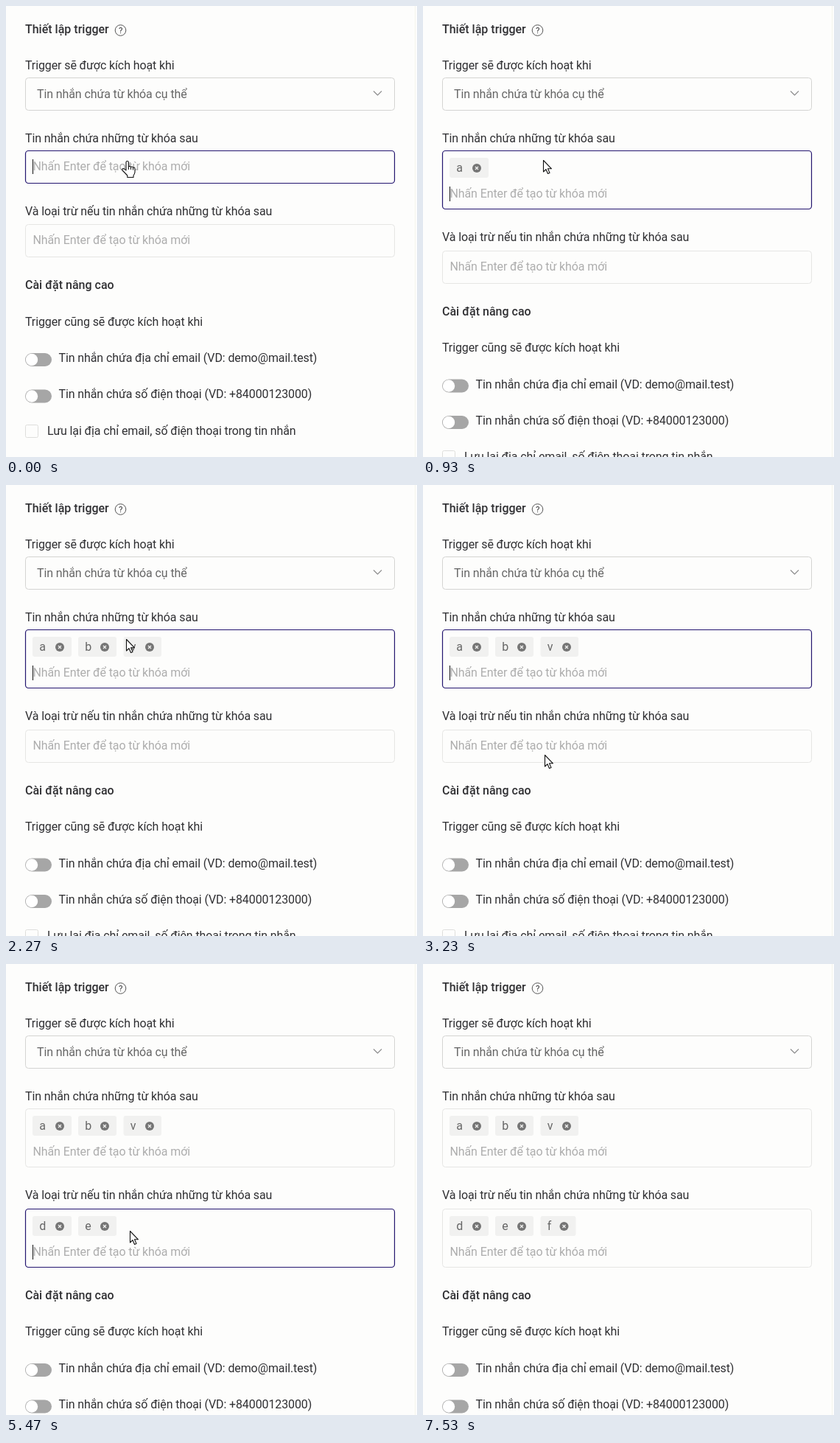
Animation of 558 by 612 pixels, one loop 7.56 s. Source, as an HTML page:

```html
<!DOCTYPE html>
<html lang="vi">
<head>
<meta charset="utf-8">
<style>
html, body { margin: 0; width: 100%; height: 100%; overflow: hidden; background: #fdfdfc; }
svg { display: block; }
text { font: 16px Roboto, sans-serif; letter-spacing: -.11px; fill: #303033; white-space: pre; }
.bold { font-weight: 500; letter-spacing: 0; }
.hint { fill: #adadad; }
.soft { fill: #666; }
</style>
</head>
<body>
<svg id="stage" width="558" height="612" viewBox="0 0 558 612"></svg>
<script>
const LOOP = 7560;
const stage = document.getElementById('stage');

// Keywords: letter, time typed, time confirmed with Enter
const fields = [
  { from: 0, to: 4080, keys: [['a', 480, 720], ['b', 1180, 1430], ['v', 1860, 2130]] },
  { from: 4080, to: 7000, keys: [['d', 4680, 4860], ['e', 5130, 5310], ['f', 5840, 6080]] }
];
const tagX = [36, 98, 159.5];
const tagW = { a: 53, b: 52, v: 51.5, d: 53, e: 52, f: 48 };

// Pointer: time, x, y
const path = [[0, 163, 209], [2480, 163, 209], [3150, 165, 366], [3400, 165, 366], [3800, 168, 362], [LOOP, 168, 362]];

const text = (x, y, s, cls = '') => `<text x="${x}" y="${y}" class="${cls}">${s}</text>`;
const box = (x, y, w, h, r, fill, stroke = 'none', sw = 1) =>
  `<rect x="${x}" y="${y}" width="${w}" height="${h}" rx="${r}" fill="${fill}" stroke="${stroke}" stroke-width="${sw}"/>`;
const line = (d, color, w = 1, fill = 'none') =>
  `<path d="${d}" stroke="${color}" stroke-width="${w}" fill="${fill}" stroke-linejoin="round"/>`;

function tag(letter, i, y) {
  const x = tagX[i], w = tagW[letter], cx = x + w - 16, cy = y + 14;
  return box(x, y, w, 27, 3, '#f1f1f0') + text(x + 9.3, y + 19, letter, 'soft') +
    `<circle cx="${cx}" cy="${cy}" r="6" fill="#757575"/>` +
    line(`M${cx - 2} ${cy - 2}l4 4m0 -4l-4 4`, '#f1f1f0', 1.3);
}

function field(f, y, t) {
  const done = f.keys.filter(k => t >= k[2]);
  const typing = f.keys.find(k => t >= k[1] && t < k[2]);
  const focused = t >= f.from && t < f.to;
  const ty = y + (done.length ? 64 : 27);
  let out = box(26.5, y + .5, 501, done.length ? 79 : 44, 4, 'none',
    focused ? '#23156f' : '#e6e6e4', focused ? 1.2 : 1);
  out += done.map((k, i) => tag(k[0], i, y + 10)).join('');
  out += typing ? text(36.5, ty, typing[0]) : text(36.5, ty, 'Nhấn Enter để tạo từ khóa mới', 'hint');
  if (focused) {
    const last = Math.max(f.from, ...f.keys.flatMap(k => [k[1], k[2]]).filter(v => v <= t));
    if ((t - last) % 1000 < 500) out += box(typing ? 45 : 36, ty - 15, 1, 20, 0, '#111');
  }
  return out;
}

const toggle = y => box(26, y - 9, 36, 18, 9, '#a6a6a6') +
  `<circle cx="35" cy="${y}" r="8.2" fill="#fff"/>`;

function pointer(t) {
  const i = path.findIndex(p => p[0] > t);
  const [t0, x0, y0] = path[i - 1], [t1, x1, y1] = path[i];
  const u = (t - t0) / (t1 - t0), e = u * u * (3 - 2 * u);
  const x = Math.round(x0 + (x1 - x0) * e), y = Math.round(y0 + (y1 - y0) * e);
  const hand = t < 480 || (t >= 3850 && t < 4680);
  const shape = hand
    ? line('M0 3Q0 1.5 1.7 1.5T3.4 3V9Q5 7.5 6.5 9.5Q8.3 8.3 9.5 10.2Q11.8 9.5 12 12V16.5Q11.6 19 10 21V23.5H1.8V21Q-1 18-5 14Q-6 12.5-4.5 11.7Q-2.5 11.3 0 14ZM3.4 9V13M6.5 9.5V13M9.5 10.2V13.5', '#111', 1.1, '#fff')
    : line('M.5 .5V16L4 12.7L6.5 18.5L9 17.4L6.5 11.8H11.5Z', '#111', 1.1, '#fff');
  return `<g transform="translate(${x} ${y})">${shape}</g>`;
}

function draw(t) {
  const [one, two] = fields.map(f => t >= f.keys[0][2]);
  const s1 = one ? 36 : 0;
  const s = (one ? 35.5 : 0) + (two ? 35.5 : 0);
  return box(555, 0, 1, 612, 0, '#f5f5ec') +
    text(26, 37, 'Thiết lập trigger', 'bold') +
    `<circle cx="155.5" cy="33" r="7.3" fill="none" stroke="#555"/>` +
    `<text x="155.6" y="37.2" text-anchor="middle" style="font-size:11.5px">?</text>` +
    text(26, 86, 'Trigger sẽ được kích hoạt khi') +
    box(26.5, 97.5, 501, 44, 4, 'none', '#d4d4d2') +
    text(42, 125, 'Tin nhắn chứa từ khóa cụ thể', 'soft') +
    line('M499 115.5L504.5 121L510 115.5', '#8c8c8c', 1.1) +
    text(26, 185, 'Tin nhắn chứa những từ khóa sau') +
    field(fields[0], 196, t) +
    text(26, 284 + (one ? 35 : 0), 'Và loại trừ nếu tin nhắn chứa những từ khóa sau') +
    field(fields[1], 296 + s1, t) +
    text(26, 384 + Math.round(s), 'Cài đặt nâng cao', 'bold') +
    text(26, 434 + Math.floor(s) - (two ? 1 : 0), 'Trigger cũng sẽ được kích hoạt khi') +
    toggle(480 + s) + text(71.5, 483 + Math.round(s), 'Tin nhắn chứa địa chỉ email (VD: demo@mail.test)') +
    toggle(529.5 + s) + text(71.5, 532 + Math.round(s), 'Tin nhắn chứa số điện thoại (VD: +84000123000)') +
    box(26.5, 568.5 + Math.floor(s), 17, 17, 2, 'none', '#dededc') +
    text(56, 582 + Math.floor(s), 'Lưu lại địa chỉ email, số điện thoại trong tin nhắn') +
    (t < 7000 ? pointer(t) : '');
}

let shown = '';
function tick() {
  const next = draw(performance.now() % LOOP);
  if (next !== shown) stage.innerHTML = shown = next;
  requestAnimationFrame(tick);
}
tick();
</script>
</body>
</html>
```
